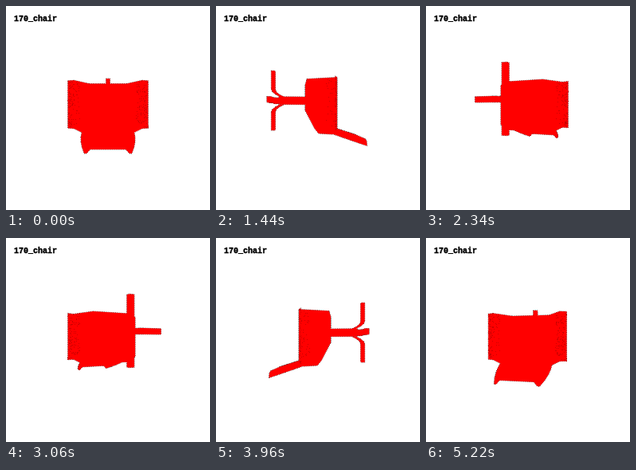
An HTML page with a canvas for the animation above (5.4 s loop, 256 px wide and 256 px high).

```html
<!DOCTYPE html>
<html>
<head>
<meta charset="utf-8">
<style>
html, body { margin: 0; width: 100%; height: 100%; overflow: hidden; background: #fff; }
canvas { display: block; }
div { position: absolute; left: 10px; top: 10px; font: bold 10px/13px "Liberation Mono", "Courier New", monospace; color: #000; -webkit-text-stroke: 0.4px #000; }
</style>
</head>
<body>
<canvas id="stage" width="256" height="256"></canvas>
<div>170_chair</div>
<script>
const ctx = document.getElementById('stage').getContext('2d');
const STEP = 180, STEPS = 30, CAMERA = 240;
const BACK = 25, WING = 40, RIM = 47.7, TOP = -32.4, HUB_Y = -9, ARM = 36;

const mix = (a, b, t) => a + (b - a) * t;
const clamp = t => Math.min(1, Math.max(0, t));
const mirror = pts => pts.map(([x, y, z]) => [-x, y, z]);

// The chair is a union of convex parts, each a list of [x, y, z] points.
const parts = [];
const across = pts => parts.push([...pts, ...mirror(pts)]);
const pair = pts => parts.push(pts, mirror(pts));
const loft = (list, slice, add) => {
  for (let i = 1; i < list.length; i++) add([...slice(list[i - 1]), ...slice(list[i])]);
};

// Seat shell: flat back, wings folding forward, rims turning back.
function column(x) {
  const t = clamp((x - BACK) / (WING - BACK));
  const z = mix(-15, 16, t) - 0.45 * Math.max(0, x - WING);
  return [[x, TOP, z], [x, mix(3.5, 24, t), z]];
}
across(column(BACK));
loft([BACK, WING, RIM], column, pair);
across([column(BACK)[1], column(WING)[1], [26, 28.5, -2], [31, 29, 13]]);

// Flap: a widening gutter, upside down.
const flap = t => ({ w: 31 - 8 * t * t, edge: 29 + 15 * t, ridge: 24 + 13 * t, z: 14 + 41 * t });
const flapTop = t => {
  const { w, ridge, z } = flap(t);
  return [[w * 0.8, ridge, z], [w * 0.8, ridge + 3, z]];
};
const flapSide = t => {
  const { w, edge, ridge, z } = flap(t);
  return [[w, edge, z], [w * 0.9, edge, z], [w * 0.95, ridge + 2, z], [w * 0.75, ridge, z], [w * 0.75, ridge + 3, z]];
};
const quarters = [0, 0.25, 0.5, 0.75, 1];
loft(quarters, flapTop, across);
loft(quarters, flapSide, pair);

// Post and four arms that bend into it.
across([-48, -15].flatMap(z => [[4.6, HUB_Y - 4.6, z], [4.6, HUB_Y + 4.6, z]]));
for (let turn = 0; turn < 4; turn++) {
  const c = Math.round(Math.cos(turn * Math.PI / 2)), s = Math.round(Math.sin(turn * Math.PI / 2));
  const armSlice = r => {
    const z = -55 + 10 * clamp((14 - r) / 9) ** 2;
    return [-3, 3].flatMap(w => [-2.1, 2.1].map(t => [r * c - w * s, HUB_Y + r * s + w * c, z + t]));
  };
  loft([5, 8, 11, 14, ARM], armSlice, pts => parts.push(pts));
}

// Dark grains scattered over the rims of the wings.
let seed = 7;
const random = () => (seed = seed * 16807 % 2147483647) / 2147483647;
const grains = Array.from({ length: 240 }, (_, i) => {
  const [top, low] = column(mix(WING - 5, RIM, random()));
  const [x, y, z] = [top[0], mix(top[1], low[1], random()), top[2]];
  return [i % 2 ? x : -x, y, z];
});

function project([x, y, z], c, s) {
  const depth = z * c - x * s;
  const k = CAMERA / (CAMERA - depth);
  return [128 + k * (x * c + z * s), 128 + k * y, depth];
}

function hull(pts) {
  const cross = (o, a, b) => (a[0] - o[0]) * (b[1] - o[1]) - (a[1] - o[1]) * (b[0] - o[0]);
  const half = list => {
    const out = [];
    for (const p of list) {
      while (out.length > 1 && cross(out.at(-2), out.at(-1), p) <= 0) out.pop();
      out.push(p);
    }
    return out.slice(0, -1);
  };
  pts.sort((a, b) => a[0] - b[0] || a[1] - b[1]);
  return [...half(pts), ...half([...pts].reverse())];
}

function draw(angle) {
  const c = Math.cos(angle), s = Math.sin(angle);
  const shape = new Path2D();
  for (const part of parts) {
    hull(part.map(p => project(p, c, s))).forEach(([x, y], i) => i ? shape.lineTo(x, y) : shape.moveTo(x, y));
    shape.closePath();
  }
  ctx.clearRect(0, 0, 256, 256);
  ctx.lineJoin = 'round';
  ctx.strokeStyle = '#200';
  ctx.setLineDash([1, 1.3]);
  ctx.stroke(shape);
  ctx.fillStyle = '#f00';
  ctx.fill(shape);
  ctx.fillStyle = '#c00';
  for (const grain of grains) {
    const [x, y, depth] = project(grain, c, s);
    if (depth > -10) ctx.fillRect(Math.floor(x), Math.floor(y), 1, 1);
  }
}

function tick() {
  const step = Math.floor(performance.now() / STEP) % STEPS;
  draw(step / STEPS * 2 * Math.PI);
  requestAnimationFrame(tick);
}
tick();
</script>
</body>
</html>
```
